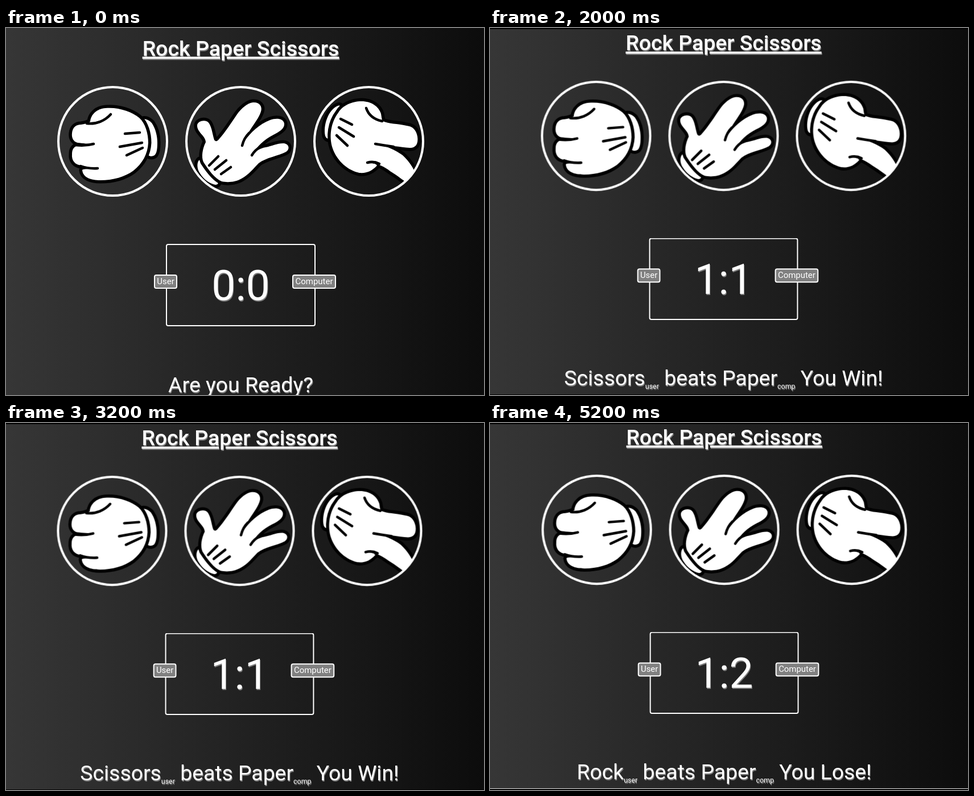
These frames come from a looping animation (840x646 px, 6 s). An HTML page:

```html
<!DOCTYPE html>
<html lang="en">
<head>
<meta charset="utf-8">
<title>Rock Paper Scissors</title>
<style>
  html, body { margin: 0; width: 100%; height: 100%; overflow: hidden; background: #000; }
  svg { display: block; width: 840px; height: 646px; font-family: Roboto, sans-serif; }
  text { fill: #fff; text-anchor: middle; }
  .shadow { filter: drop-shadow(1.25px 2px 0 #808080); }
  .title { font-size: 37.5px; font-weight: 500; text-decoration: underline; }
  .score { font-size: 75px; }
  .msg { font-size: 37.5px; }
  .sub { font-size: 12.5px; }
  .badge text { font-size: 15px; }
  .badge rect { fill: #808080; stroke: #fff; stroke-width: 2; }
  .frame { fill: none; stroke: #fff; stroke-width: 2; }
  .ring { fill: none; stroke: #fff; stroke-width: 4; }
  .skin { fill: #fff; stroke: #000; stroke-width: 11; stroke-linejoin: round; paint-order: stroke; }
  .ink { fill: none; stroke: #000; stroke-width: 4.5; stroke-linecap: round; }
</style>
</head>
<body>
<svg viewBox="0 0 840 646">
  <defs>
    <linearGradient id="bg" gradientUnits="userSpaceOnUse" x1="-260" y1="0" x2="1085" y2="0">
      <stop offset="0" stop-color="#434343"/>
      <stop offset="1" stop-color="#000"/>
    </linearGradient>
    <clipPath id="disc"><circle r="95"/></clipPath>
  </defs>
  <rect width="840" height="646" fill="url(#bg)"/>

  <g id="page">
    <g class="shadow"><text class="title" x="412.5" y="48.5">Rock Paper Scissors</text></g>
    <g id="hands"></g>
    <rect class="frame" x="282" y="381" width="261" height="143" rx="3"/>
    <g class="badge">
      <rect x="261" y="435" width="39" height="23" rx="3"/>
      <text x="280.5" y="451">User</text>
      <rect x="504" y="435" width="75" height="23" rx="3"/>
      <text x="541.5" y="451">Computer</text>
    </g>
    <g id="rounds" class="shadow"></g>
  </g>

  <g id="edges">
    <g></g>
    <path d="M0 0H840V2H0ZM0 645H840V646H0Z"/>
    <g>
      <path d="M0 0H840V2H0ZM0 644H840V646H0Z"/>
      <path d="M0 643H840V644H0Z" fill="#e8e8e8"/>
    </g>
  </g>
</svg>
<script>
const LOOP = 6000;
const $ = id => document.getElementById(id);

// Each hand: cuff, glove and ink lines, in page coordinates
const hands = [
  {
    x: 187.5,
    cuff: 'M238 163C242 158 250 161 256 167C263 177 266 191 266 202C266 212 265 219 262 223C259 226 254 227 250 224Z',
    glove: `M148 165C149 152 160 142 175 141C197 139 221 147 234 158C245 168 250 186 250 202
      C249 222 240 238 224 251C209 262 188 268 166 268C149 268 135 263 134 250
      C135 248 145 248 162 247C150 246 141 245 133 242C121 241 115 233 116 222
      C116 214 119 209 126 207C134 208 145 206 155 204C146 204 134 203 126 202
      C118 200 115 193 116 185C117 175 123 170 132 170C138 169 143 168 148 165Z`,
    ink: 'M142 168C159 170 174 163 184 152M122 206Q139 208 154 204M131 243Q144 248 161 247M209 186L235 184M200 209L239 202M212 224L240 211'
  },
  {
    x: 412.5,
    cuff: 'M340 232C335 236 335 248 341 256C348 267 358 274 368 276C372 276 374 273 372 270Z',
    glove: `M336 171C337 163 352 160 357 168C362 176 363 188 366 197C368 200 371 200 374 196
      C385 184 397 165 406 152C413 142 424 132 434 131C445 130 451 138 448 147
      C443 163 427 178 417 202C430 183 446 169 464 162C475 158 487 159 489 168
      C490 177 480 183 470 188C454 196 441 208 433 223C439 216 446 212 456 210
      C467 208 476 203 487 203C497 203 500 213 492 218C479 225 457 228 444 238
      C435 247 427 258 414 265C402 272 388 272 379 270C367 265 356 250 347 236
      C343 227 345 213 351 201C351 190 335 183 336 171Z`,
    ink: 'M415 207Q418 194 427 185M432 224Q438 214 448 209M357 242L373 226M367 249L387 233M378 257L395 245'
  },
  {
    x: 637.5,
    cuff: 'M583 137C590 135 589 140 584 147C573 161 571 178 569 193C568 197 563 195 561 190C557 172 566 144 583 137Z',
    glove: `M584 149C591 137 607 129 625 129C642 129 655 138 659 151C660 156 660 161 662 164
      C673 169 687 168 704 172C715 173 721 180 723 191C725 204 720 211 710 211
      C693 210 673 206 650 204C667 207 685 215 697 224C710 236 715 246 722 260L712 277
      C701 271 690 261 675 252C665 244 653 238 638 237C645 238 650 239 652 242
      C643 252 634 256 621 255C602 251 582 235 574 212C567 191 571 166 584 149Z`,
    ink: 'M633 141C637 153 647 161 661 164M635 237Q646 234 656 239M649 204Q666 207 681 209M588 160L608 170M585 175L611 191M581 189L600 207'
  }
];

$('hands').innerHTML = hands.map(h => `
  <g transform="translate(${h.x} 199.5)">
    <g clip-path="url(#disc)"><g transform="translate(${-h.x} -199.5)">
      <path class="skin" d="${h.cuff}"/>
      <path class="skin" d="${h.glove}"/>
      <path class="ink" d="${h.ink}"/>
    </g></g>
    <circle class="ring" r="95.5"/>
  </g>`).join('');

const beats = (user, comp, end) =>
  `${user}<tspan class="sub" dy="6">user</tspan><tspan dy="-6"> beats ${comp}</tspan>` +
  `<tspan class="sub" dy="6">comp</tspan><tspan dy="-6"> You ${end}!</tspan>`;

const rounds = [
  { score: '0:0', msg: 'Are you Ready?', view: 'none' },
  { score: '1:1', msg: beats('Scissors', 'Paper', 'Win'), view: 'translate(-0.2px, -8.8px) scale(0.9956)' },
  { score: '1:2', msg: beats('Rock', 'Paper', 'Lose'), view: 'translate(0.9px, -10.7px) scale(0.9956)' }
];

$('rounds').innerHTML = rounds.map(r => `
  <g>
    <text class="score" x="412.5" y="479">${r.score}</text>
    <text class="msg" x="412.5" y="641">${r.msg}</text>
  </g>`).join('');

// Hold each value for an equal share of the loop
function cycle(el, prop, values) {
  const frames = [...values, values[0]].map((v, i) => ({
    [prop]: v, offset: i / values.length, easing: 'steps(1, end)'
  }));
  el.animate(frames, { duration: LOOP, iterations: Infinity }).startTime = 0;
}

cycle($('page'), 'transform', rounds.map(r => r.view));
for (const id of ['rounds', 'edges']) {
  [...$(id).children].forEach((el, i) =>
    cycle(el, 'visibility', rounds.map((_, n) => n === i ? 'visible' : 'hidden')));
}
</script>
</body>
</html>
```
